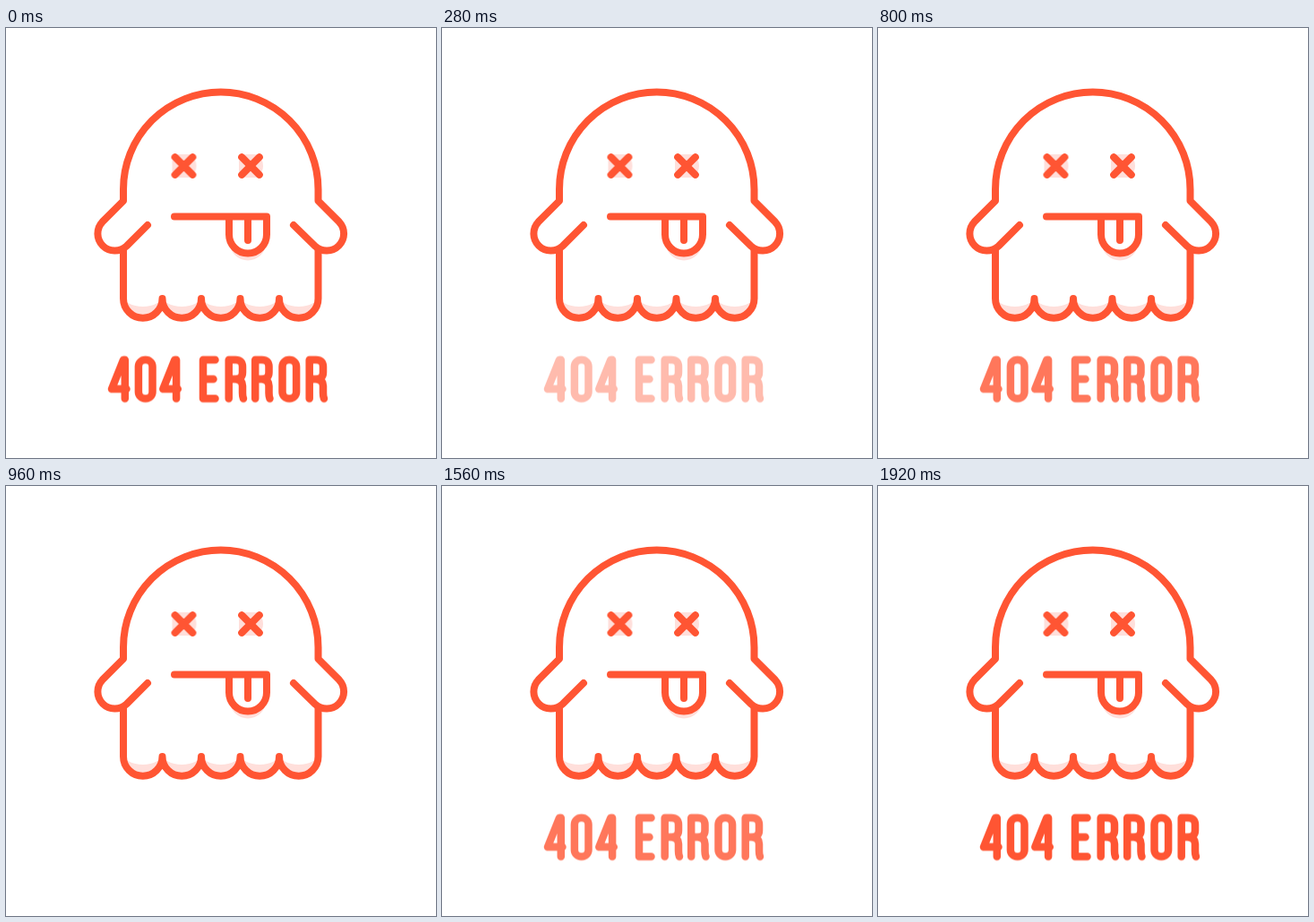
Write an HTML page that moves like this. It is 480x480 px and loops after 2 s.

```html
<!DOCTYPE html>
<html lang="en">
<head>
<meta charset="utf-8">
<title>404 error</title>
<style>
  html, body { margin: 0; width: 100%; height: 100%; overflow: hidden; background: #fff; }
  svg { display: block; width: 100vw; height: 100vh; }
  .line { fill: none; stroke: #ff5533; stroke-width: 8; stroke-linecap: round; stroke-linejoin: round; }
  .pale { fill: #ffdfdb; }
  .label { stroke-width: 8.5; animation: blink 2s steps(5, end) infinite; }
  .open { animation: open 2s step-end infinite; }
  .dead { animation: dead 2s step-end infinite; }

  @keyframes blink {
    0%, 20%, 38%, 58%, 76%, 96%, 100% { opacity: 1; }
    10%, 48%, 86% { opacity: 0; }
  }
  @keyframes open { 0% { opacity: 1; } 2%, 100% { opacity: 0; } }
  @keyframes dead { 0% { opacity: 0; } 2%, 100% { opacity: 1; } }
</style>
</head>
<body>
<svg viewBox="0 0 480 480" role="img" aria-label="404 ERROR">
  <defs>
    <clipPath id="box"><rect x="-13" y="-13" width="27" height="26"/></clipPath>
    <g id="eye">
      <circle class="pale open" r="14"/>
      <g class="dead">
        <circle class="pale" r="14" clip-path="url(#box)"/>
        <path class="line" d="M-9.8-9.8 9.8 9.8M9.8-9.8-9.8 9.8"/>
      </g>
    </g>
    <path id="scallop" class="pale" d="M0 0a21.75 21.75 0 0 0 43.5 0v-3a21.75 12 0 0 1-43.5 0z"/>
    <path id="four" d="M18.8 47.3V4H17L4 36.5H20.5"/>
    <rect id="zero" x="4.2" y="4" width="15.6" height="43.3" rx="7.5"/>
    <path id="r" d="M4.2 47.3V4H11.5Q19.5 4 19.5 11.5V18Q19.5 25.5 11.5 25.5H4.2M12 25.5Q19.5 26.5 19.5 33V41Q19.5 45 20.5 47.3"/>
  </defs>

  <g transform="translate(131 302)">
    <use href="#scallop"/>
    <use href="#scallop" x="43.5"/>
    <use href="#scallop" x="87"/>
    <use href="#scallop" x="130.5"/>
    <use href="#scallop" x="174"/>
  </g>
  <path class="pale" d="M249 234a21 21 0 0 0 42 0l-1 6a20 19.5 0 0 1-40 0z"/>

  <g class="line">
    <path d="M158 220L134.6 243.4A19.1 19.1 0 0 1 107.6 216.4L131 193V180A108.75 108.5 0 0 1 348.5 180V193L371.9 216.4A19.1 19.1 0 0 1 344.9 243.4L321 220"/>
    <path d="M131 247V302a21.75 21.75 0 0 0 43.5 0a21.75 21.75 0 0 0 43.5 0a21.75 21.75 0 0 0 43.5 0a21.75 21.75 0 0 0 43.5 0a21.75 21.75 0 0 0 43.5 0V247"/>
    <path d="M188 210.5H291V230.5a21 21 0 0 1-42 0V212M270 212V237"/>
  </g>

  <use href="#eye" x="198.5" y="154"/>
  <use href="#eye" x="273" y="154"/>

  <g class="line label" transform="translate(0 366.4)">
    <use href="#four" x="114"/>
    <use href="#zero" x="143.7"/>
    <use href="#four" x="171.3"/>
    <path d="M233.5 4H220V47.3H233.5M220 25.5H231.5"/>
    <use href="#r" x="244.5"/>
    <use href="#r" x="274"/>
    <use href="#zero" x="304.3"/>
    <use href="#r" x="334.5"/>
  </g>
</svg>
</body>
</html>
```
